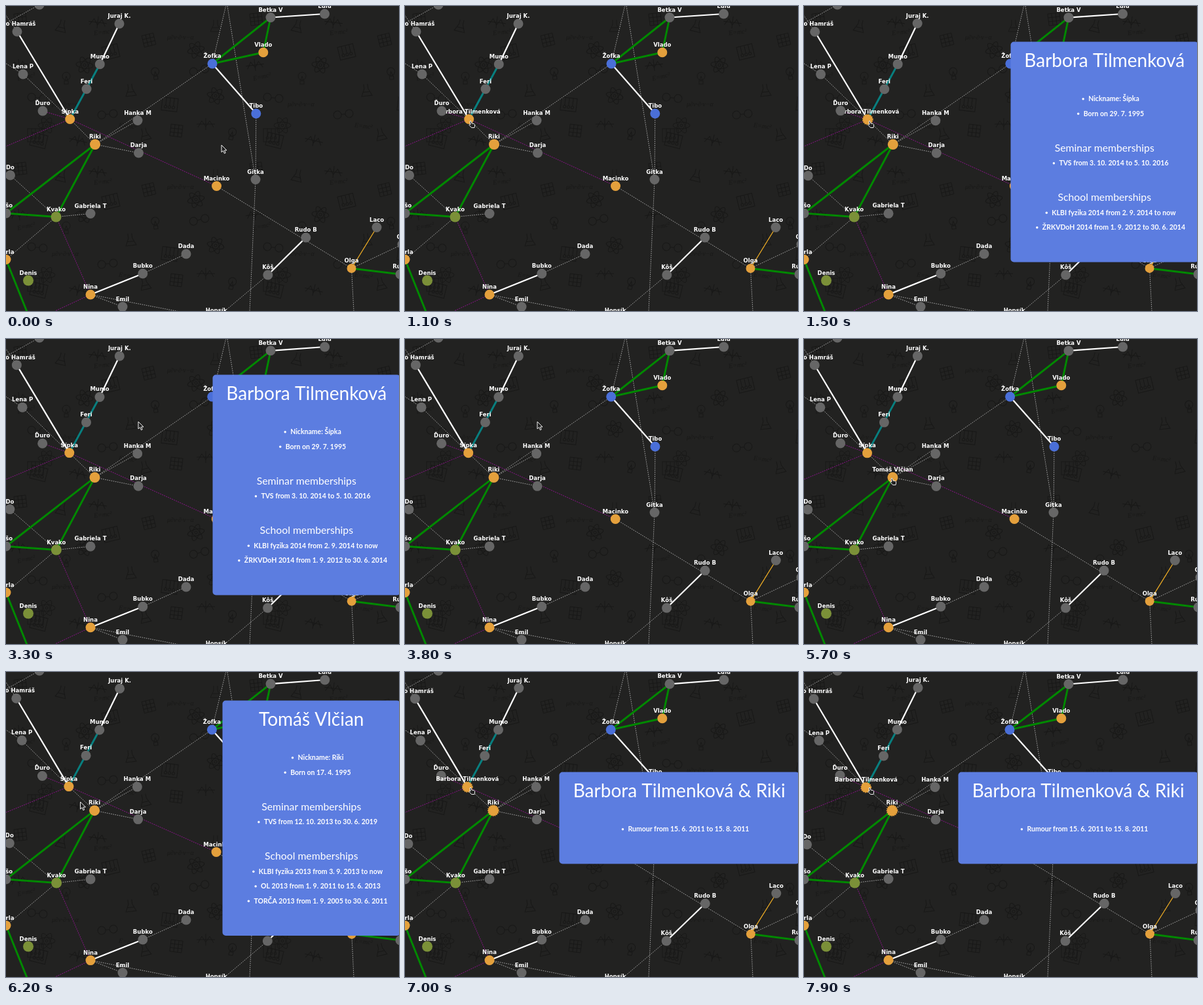
Recreate the animation shown at these times as an HTML page with a canvas. Size 600x465 px, loop 8000 ms.

```html
<!DOCTYPE html>
<html lang="sk">
<head>
<meta charset="utf-8">
<style>
html, body { margin: 0; width: 100%; height: 100%; overflow: hidden; background: #222221; }
canvas { display: block; }
</style>
</head>
<body>
<canvas id="stage" width="600" height="465"></canvas>
<script>
const ctx = document.getElementById('stage').getContext('2d');
const TAU = Math.PI * 2, LOOP = 8000;
const GRAY = '#666', ORANGE = '#e4a03c', BLUE = '#4a6fd8', OLIVE = '#7b9038';

// id: label, x, y, colour, drift x, drift y, radius
const nodes = {
  top: ['', 51, -2, GRAY],
  leo: ['Leo Hamráš', 17, 39, GRAY, -2, 2],
  juraj: ['Juraj K.', 173, 27, GRAY, 1, -3],
  mumo: ['Mumo', 143.3, 88.8, GRAY, -1, -1],
  feri: ['Feri', 123, 126.5, GRAY, -1.5, 1.5],
  lena: ['Lena P', 26, 104, GRAY, -3, 0.5],
  sipka: ['Šípka', 97.7, 172.5, ORANGE, -3, 3.5],
  duro: ['Ďuro', 56, 160, GRAY, -1, -2.5],
  hanka: ['Hanka M', 201, 174.5, GRAY, -1, 1],
  riki: ['Riki', 136, 211, ORANGE, -1.5, 0.3, 8],
  darja: ['Darja', 202.5, 224, GRAY, -1.5, 1],
  do: ['Do', 6.5, 258, GRAY, -2, 5],
  riso: ['Rišo', 0, 316, GRAY],
  kvako: ['Kvako', 76.5, 321.5, OLIVE, 1, 0, 8],
  gabriela: ['Gabriela T', 129, 316.5, GRAY, 0, -1],
  perla: ['Perla', 0, 386.5, ORANGE],
  denis: ['Denis', 34, 418.5, OLIVE, 0, 0, 8],
  nina: ['Nina', 129, 440, ORANGE, 0, -0.7],
  emil: ['Emil', 178, 458.5, GRAY],
  bubko: ['Bubko', 208.8, 408, GRAY],
  dada: ['Dada', 275, 378, GRAY],
  hopsik: ['Hopsík', 321, 476, GRAY],
  zofka: ['Žofka', 315, 88, BLUE, -1, 0],
  betka: ['Betka V', 404, 17.5, GRAY, 0, 1],
  lulu: ['Lulu', 486.5, 12, GRAY, 0.5, 0],
  vlado: ['Vlado', 392.8, 70.7, ORANGE],
  tibo: ['Tibo', 381.8, 164, BLUE, 0.5, 0],
  gitka: ['Gitka', 381, 264.5, GRAY],
  macinko: ['Macinko', 321.5, 274.5, ORANGE, -0.8, 0],
  rudo: ['Rudo B', 457.8, 353, GRAY, 0.6, 0],
  kos: ['Kôš', 399.8, 410, GRAY, -0.8, 0],
  olga: ['Olga', 527.5, 400, ORANGE, 0.5, -0.5, 7],
  laco: ['Laco', 566, 337.5, GRAY, 1, 0],
  ruzo: ['Rúžo', 602, 409, GRAY],
  oto: ['Oto', 605, 363.5, GRAY],
  // anchors outside the view
  n: ['', 337, -6], w1: ['', -12, 219], w2: ['', -20, 75], w3: ['', -14, 34], nw: ['', -8, 3],
  sw: ['', 75, 465], s1: ['', 32, 466], s2: ['', 265, 466], s3: ['', 372, 466], s4: ['', 531, 466]
};
const fullNames = { sipka: 'Barbora Tilmenková', riki: 'Tomáš Vlčian' };

const links = [
  { color: '#b5b5b5', width: 0.9, dash: [1.6, 1.6], pairs: `top-w3 nw-leo lena-w2 lena-sipka sipka-riki
    riki-zofka riki-hanka riki-darja do-kvako kvako-gabriela kvako-perla nina-emil nina-s2 bubko-dada
    zofka-n n-gitka tibo-gitka gitka-s3 macinko-olga kos-hopsik olga-oto olga-s4` },
  { color: '#a010a0', width: 0.9, dash: [1.8, 1.5], pairs: 'duro-sipka sipka-macinko sipka-w1 kvako-nina nina-sw' },
  { color: '#fff', width: 2.2, pairs: 'leo-sipka juraj-mumo betka-lulu zofka-tibo rudo-kos nina-bubko' },
  { color: '#008800', width: 3, pairs: 'betka-zofka betka-vlado zofka-vlado riki-riso riki-kvako riso-kvako perla-s1 olga-ruzo' },
  { color: '#087f7f', width: 3, pairs: 'mumo-sipka' },
  { color: '#f0ae25', width: 1.3, pairs: 'olga-laco' }
];

// Lines starting with # are headings, the others list items
const panels = [
  { from: 1400, to: 3800, x: 315.5, y: 54.5, title: 'Barbora Tilmenková', lines: ['Nickname: Šípka', 'Born on 29. 7. 1995',
    '#Seminar memberships', 'TVS from 3. 10. 2014 to 5. 10. 2016', '#School memberships',
    'KLBI fyzika 2014 from 2. 9. 2014 to now', 'ŽRKVDoH 2014 from 1. 9. 2012 to 30. 6. 2014'] },
  { from: 5800, to: 7000, x: 330.5, y: 43.5, title: 'Tomáš Vlčian', lines: ['Nickname: Riki', 'Born on 17. 4. 1995',
    '#Seminar memberships', 'TVS from 12. 10. 2013 to 30. 6. 2019', '#School memberships',
    'KLBI fyzika 2013 from 3. 9. 2013 to now', 'OL 2013 from 1. 9. 2011 to 15. 6. 2013',
    'TORČA 2013 from 1. 9. 2005 to 30. 6. 2011'] },
  { from: 7000, to: LOOP, x: 235.5, y: 152.5, title: 'Barbora Tilmenková & Riki', lines: ['Rumour from 15. 6. 2011 to 15. 8. 2011'] }
];

const cursorPath = [[200, 329, 212], [1000, 97, 175], [1100, 99, 175], [2200, 99, 175], [3000, 192, 144], [3300, 202, 126],
  [4100, 202, 126], [4900, 114, 205], [5100, 119, 210], [5300, 119, 210], [5500, 133, 212], [5800, 133, 212],
  [6200, 113.5, 198], [6600, 113.5, 198], [7000, 99, 176]];
const driftPath = [[1300, 0], [1700, 0.3], [5600, 0.35], [6200, 0.6], [7700, 1]];

function track(keys, t) {
  if (t <= keys[0][0]) return keys[0].slice(1);
  for (let i = 1; i < keys.length; i++) {
    const [a, ...p] = keys[i - 1], [b, ...q] = keys[i];
    if (t < b) return p.map((v, k) => v + (q[k] - v) * (t - a) / (b - a));
  }
  return keys[keys.length - 1].slice(1);
}

function line(c, ...pts) {
  c.beginPath();
  for (let i = 0; i < pts.length; i += 2) c.lineTo(pts[i], pts[i + 1]);
  c.stroke();
}

function makeBackground() {
  const tile = document.createElement('canvas');
  tile.width = 360; tile.height = 228;
  const c = tile.getContext('2d');
  c.fillStyle = '#222221';
  c.fillRect(0, 0, 360, 228);
  c.strokeStyle = c.fillStyle = '#191918';
  const ring = (x, y, rx, ry = rx, a = 0) => { c.beginPath(); c.ellipse(x, y, rx, ry, a, 0, TAU); c.stroke(); };
  const icons = {
    grid() { for (let i = -9; i <= 9; i += 6) { line(c, i, -9, i, 9); line(c, -9, i, 9, i); } },
    atom() { for (let i = 0; i < 3; i++) ring(0, 0, 13, 5, i * Math.PI / 3); ring(0, 0, 2); },
    bulb() { ring(0, -3, 6); c.strokeRect(-3, 4, 6, 5); line(c, -2, 3, 0, -3, 2, 3); },
    glasses() { ring(-9, 0, 6); ring(9, 0, 6); line(c, -3, 0, 3, 0); },
    pendulum() { c.strokeRect(-12, -10, 24, 20); for (let i = -6; i <= 6; i += 6) { line(c, i, -10, i, 2); ring(i, 4, 2); } },
    flask() { line(c, -3, -9, -3, -2, -8, 9, 8, 9, 3, -2, 3, -9); line(c, -5, 3, 5, 3); },
    wave() { line(c, -14, 0, 14, 0); line(c, 0, -9, 0, 9); line(c, -12, 5, -6, -5, 0, 4, 6, -5, 12, 5); },
    energy() { c.fillText('E=mc²', -13, 3); },
    formula() { c.fillText('μ∂ν·∂·ν−α', -30, 3); }
  };
  c.font = 'italic 10px "Liberation Serif", serif';
  const spots = `grid 218 52 grid 260 190 grid 22 20 atom 320 137 atom 62 182 atom 290 67 atom 120 90
    bulb 228 103 bulb 345 195 bulb 92 110 glasses 295 98 glasses 48 140 glasses 155 165 pendulum 50 205
    pendulum 45 197 pendulum 160 70 pendulum 250 150 flask 190 128 flask 85 30 flask 320 30 flask 212 195
    wave 140 25 wave 20 90 wave 110 205 wave 305 180 energy 30 108 energy 185 183 energy 147 40 formula 276 48 formula 100 150`.split(/\s+/);
  for (let i = 0; i < spots.length; i += 3) {
    c.save();
    c.translate(+spots[i + 1], +spots[i + 2]);
    if (spots[i] !== 'formula') c.rotate((i % 5 - 2) * 0.12);
    icons[spots[i]]();
    c.restore();
  }
  return ctx.createPattern(tile, 'repeat');
}
const background = makeBackground();

function drawNode(id, [x, y], hover, marked) {
  const [label, , , color, , , r = 7.5] = nodes[id];
  if (!color) return;
  ctx.fillStyle = ctx.strokeStyle = color;
  ctx.beginPath();
  ctx.arc(x, y, r, 0, TAU);
  ctx.fill();
  if (marked) {
    ctx.lineWidth = 1.8;
    ctx.setLineDash([1.5, 1.5]);
    ctx.stroke();
    ctx.setLineDash([]);
  }
  ctx.fillStyle = '#fff';
  ctx.font = 'bold 8.5px "DejaVu Sans", sans-serif';
  ctx.fillText(hover ? fullNames[id] : label, x, y - 9);
}

function drawPanel({ x, y, title, lines }) {
  const cx = (x + 602) / 2;
  let base = y + 68, bottom = y + 49.5 + 90.5;
  lines.forEach((s, i) => { if (i) bottom += s[0] === '#' ? 54 : lines[i - 1][0] === '#' ? 21.5 : 22.5; });
  ctx.fillStyle = '#5c7de0';
  ctx.beginPath();
  ctx.roundRect(x, y, 602 - x, bottom - y, 5);
  ctx.fill();
  ctx.fillStyle = '#fff';
  ctx.font = '28px Lato, sans-serif';
  ctx.fillText(title, cx, y + 38.5);
  lines.forEach((s, i) => {
    const head = s[0] === '#';
    base += head ? 54 : i && lines[i - 1][0] === '#' ? 21.5 : 22.5;
    ctx.font = head ? '15.75px Lato, sans-serif' : 'bold 10.5px Lato, sans-serif';
    if (head) return ctx.fillText(s.slice(1), cx, base);
    ctx.fillText(s, cx + 14.2, base);
    ctx.beginPath();
    ctx.arc(cx + 14.2 - ctx.measureText(s).width / 2 - 8, base - 3.3, 1.7, 0, TAU);
    ctx.fill();
  });
}

const arrow = new Path2D('M0 0V11L2.6 8.7L4.4 12.8L6.2 12L4.5 8H8Z');
const hand = new Path2D('M0 1Q1-1 2 1L3 4L6.5 4.5Q8 5 7.5 8L7 10.5H2.5L-1 6.5Q-1 5 1 5.5Z');

function drawCursor(t) {
  const [x, y] = track(cursorPath, t);
  const over = (t >= 1100 && t < 2300) || (t >= 5400 && t < 5950) || t >= 6900;
  ctx.save();
  ctx.translate(x, y);
  ctx.fillStyle = '#222';
  ctx.strokeStyle = '#eee';
  ctx.lineWidth = 1;
  ctx.fill(over ? hand : arrow);
  ctx.stroke(over ? hand : arrow);
  ctx.restore();
}

function draw(t) {
  const [drift] = track(driftPath, t);
  const pos = {};
  for (const id in nodes) {
    const [, x, y, , dx = 0, dy = 0] = nodes[id];
    pos[id] = [x + dx * drift, y + dy * drift];
  }
  ctx.fillStyle = background;
  ctx.fillRect(0, 0, 600, 465);
  for (const { color, width, dash = [], pairs } of links) {
    ctx.strokeStyle = color;
    ctx.lineWidth = width;
    ctx.setLineDash(dash);
    for (const pair of pairs.split(/\s+/)) {
      const [a, b] = pair.split('-');
      line(ctx, ...pos[a], ...pos[b]);
    }
  }
  ctx.setLineDash([]);
  ctx.textAlign = 'center';

  const edgeOpen = t >= 7000;
  const hover = { sipka: (t >= 1000 && t < 2300) || t >= 6900, riki: t >= 5400 && t < 5950 };
  const marked = { sipka: (t >= 1400 && t < 2300) || edgeOpen, riki: edgeOpen };
  const order = Object.keys(nodes);
  if (edgeOpen) order.push(...order.splice(order.indexOf('sipka'), 1));
  for (const id of order) drawNode(id, pos[id], hover[id], marked[id]);

  for (const p of panels) if (t >= p.from && t < p.to) drawPanel(p);
  drawCursor(t);
}

const start = performance.now();
function tick() {
  draw((performance.now() - start) % LOOP);
  requestAnimationFrame(tick);
}
tick();
</script>
</body>
</html>
```
